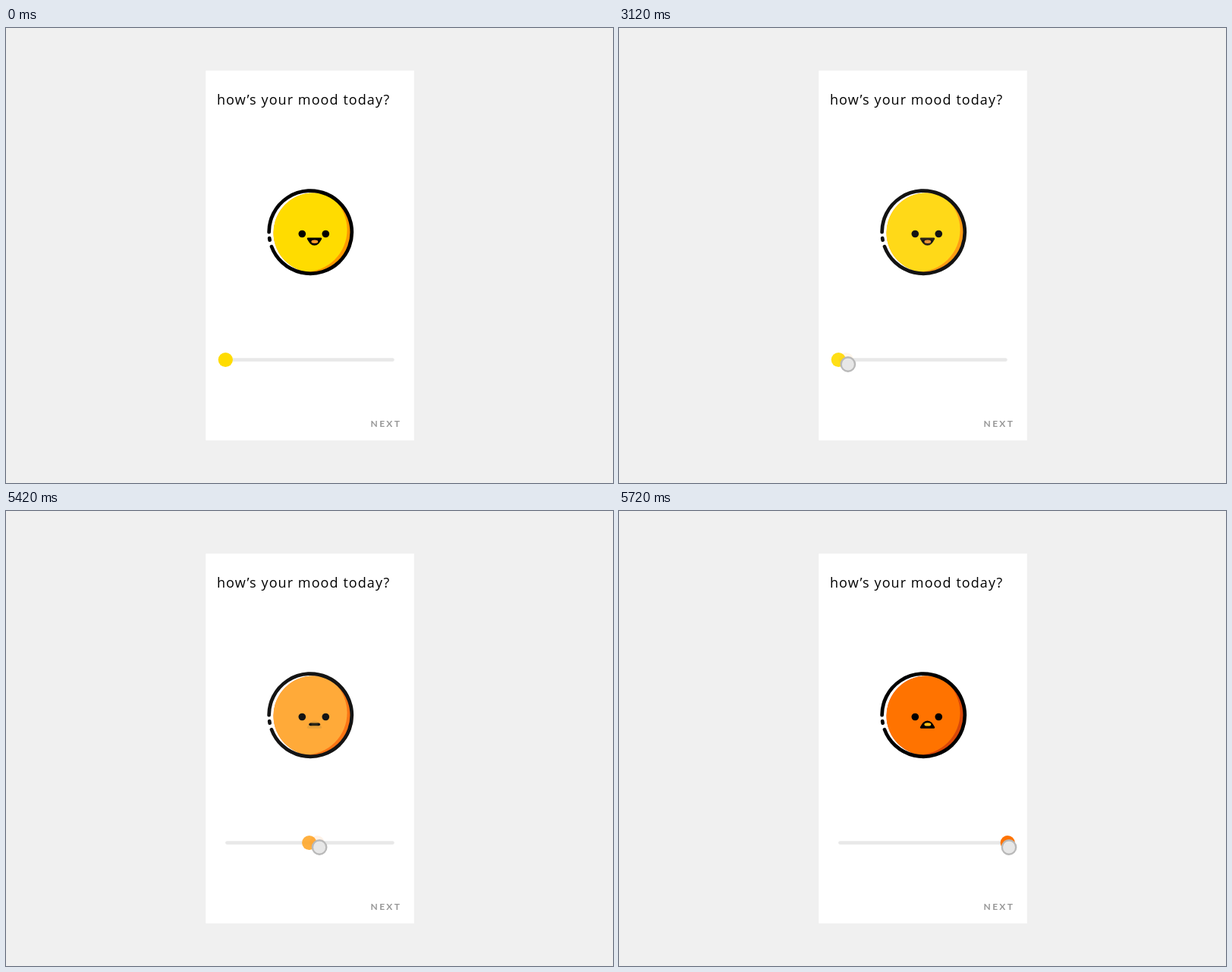
An HTML page that plays this animation: 800x600 px, repeating every 7720 ms.

```html
<!DOCTYPE html>
<html lang="en">
<head>
<meta charset="utf-8">
<title>Mood slider</title>
<style>
  html, body { margin: 0; width: 100%; height: 100%; overflow: hidden; background: #f0f0f0; }
  svg { display: block; width: 800px; height: 600px; }
  .title { font: 400 18px "Open Sans", "Noto Sans", sans-serif; letter-spacing: 1.07px; }
  .next { font: 700 12px Lato, "Open Sans", sans-serif; letter-spacing: 2.3px; fill: #979797; }
</style>
</head>
<body>
<svg viewBox="0 0 800 600">
  <defs>
    <clipPath id="body"><circle cx="405" cy="270" r="52.5"/></clipPath>
    <g id="lines">
      <path id="ring" fill="none" stroke="#000" stroke-width="4.7" stroke-linecap="round"/>
      <circle cx="390.3" cy="271.5" r="4.8"/>
      <circle cx="421.3" cy="271.5" r="4.8"/>
    </g>
  </defs>
  <rect x="263.3" y="56.2" width="274.5" height="487.6" fill="#fff"/>
  <text class="title" x="278" y="100.5">how’s your mood today?</text>
  <text class="next" x="480.6" y="526">NEXT</text>
  <path d="M291.3 437.5H509.5" stroke="#e8e8e8" stroke-width="4.4" stroke-linecap="round"/>
  <g id="moods"></g>
  <circle id="cursor" cy="443.5" r="9.2" fill="#e7e7e7" stroke="#b9b9b9" stroke-width="2.4"/>
</svg>
<script>
const LOOP = 7720, STEP = 30;
const FADE_IN = 2000, MOVES = [3120, 5420];
const MOVE_STEPS = 11, FADE_STEPS = 5;
const CURSOR_X = [291.7, 403, 514];

const openMouth = (flip, tongue) => `
  <g ${flip ? 'transform="matrix(1 0 0 -1 0 563.2)"' : ''}>
    <path d="M398.2 277.8H414.8C412.4 282 410.3 285.4 406.5 285.4S400.6 282 398.2 277.8Z"
      stroke="#000" stroke-width="2.8" stroke-linejoin="round"/>
    <ellipse cx="406.8" cy="281.8" rx="4.4" ry="2.2" fill="${tongue}"/>
  </g>`;
const flatMouth = '<path d="M401.2 281.3H412.2" stroke="#000" stroke-width="3.8" stroke-linecap="round"/>';

const moods = [
  { x: 289.3, light: '#ffdc00', shade: '#ff9800', mouth: openMouth(false, '#ff9a2a') },
  { x: 399.7, light: '#ffa92d', shade: '#ff6d00', mouth: flatMouth },
  { x: 512.2, light: '#ff7300', shade: '#d94708', mouth: openMouth(true, '#ffc21a') }
];

const get = id => document.getElementById(id);
const lerp = (a, b, p) => a + (b - a) * p;
const clamp = v => Math.max(0, Math.min(1, v));

function arc(from, to) {
  const r = 54.6;
  const point = deg => {
    const a = deg * Math.PI / 180;
    return `${401.2 + r * Math.cos(a)} ${269.2 + r * Math.sin(a)}`;
  };
  return `M${point(from)}A${r} ${r} 0 ${to - from > 180 ? 1 : 0} 1 ${point(to)}`;
}

get('ring').setAttribute('d', arc(180, 519.6) + arc(168.9, 171.6));
get('moods').innerHTML = moods.map(m => `
  <g>
    <circle cx="405" cy="270" r="52.5" fill="${m.shade}"/>
    <circle cx="394.3" cy="266.1" r="55.3" fill="${m.light}" clip-path="url(#body)"/>
    <use href="#lines"/>
    ${m.mouth}
    <circle class="knob" cy="437.5" r="9.6" fill="${m.light}"/>
  </g>`).join('');

const layers = [...get('moods').children];
const knobs = layers.map(g => g.querySelector('.knob'));
const cursor = get('cursor');

// Progress in equal steps; the first step already shows at the start time.
function progress(t, start, steps) {
  return clamp((Math.floor((t - start) / STEP) + 1) / steps);
}

function draw(t) {
  const p = [1, ...MOVES.map(start => progress(t, start, MOVE_STEPS)), 0];
  layers.forEach((layer, i) => {
    layer.setAttribute('opacity', p[i] * (1 - p[i + 1]));
    const x = i ? lerp(moods[i - 1].x, moods[i].x, p[i]) : moods[0].x;
    knobs[i].setAttribute('cx', x);
  });
  const x = p[2] ? lerp(CURSOR_X[1], CURSOR_X[2], p[2]) : lerp(CURSOR_X[0], CURSOR_X[1], p[1]);
  cursor.setAttribute('cx', x);
  cursor.setAttribute('opacity', progress(t, FADE_IN, FADE_STEPS));
}

const begin = performance.now();
function tick() {
  draw((performance.now() - begin) % LOOP);
  requestAnimationFrame(tick);
}
tick();
</script>
</body>
</html>
```
